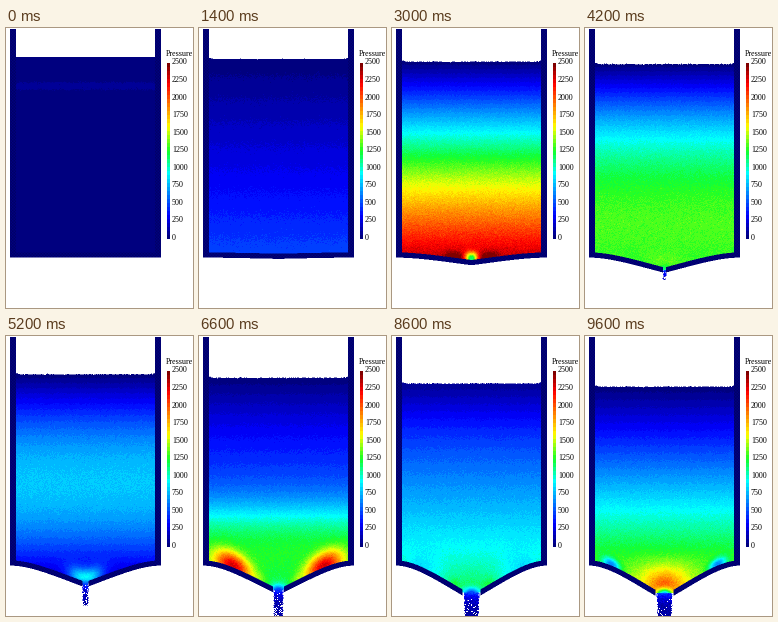
These frames come from a looping animation (187x280 px, 9.8 s). A matplotlib script:

```python
import numpy as np
import matplotlib.pyplot as plt
from matplotlib.animation import FuncAnimation
from matplotlib.colors import LinearSegmentedColormap

W, H, DPI = 187, 280, 100
FRAMES, STEP = 49, 200
SS = 2                                  # supersampling
CX, OUTER, INNER, HINGE_Y = 79.5, 75.5, 69.7, 227
OPENING = 3.3                           # seconds until the gates part
P_MAX = 2500

cmap = LinearSegmentedColormap.from_list("pressure", [
    (0, (0, 0, .5)), (.125, (0, 0, 1)), (.37, (0, 1, 1)), (.5, (.08, 1, .15)),
    (.64, (1, 1, 0)), (.89, (1, 0, 0)), (1, (.5, 0, 0))], N=44)

# Local pressure spots on the gates, mirrored about the axis:
# peak time, distance from the axis, x radius, y radius, pressure change
SPOTS = [
    (3.0, 0, 6, 6, -1250),
    (3.0, 17, 9, 5, 260),
    (5.2, 0, 16, 11, 850),
    (6.6, 45, 19, 14, 1150),
    (7.6, 41, 17, 19, -800),
    (7.6, 17, 7, 6, 850),
    (9.6, 0, 18, 21, 560),
    (9.6, 53, 9, 6, -700),
]

x = (np.arange(W * SS) + .5) / SS
y = (np.arange(H * SS) + .5) / SS
X, Y = np.meshgrid(x, y)
D = np.abs(X - CX)
rng = np.random.default_rng(4)
grain = rng.normal(0, 1, (H, W))
spray = rng.random((H, W))
ripple = rng.normal(0, .25, W).repeat(SS)


def enlarge(a):
    return a.repeat(SS, 0).repeat(SS, 1)


def pulse(t, peak, width):
    """Smooth rise and fall around a peak time."""
    return np.cos(np.pi / 2 * np.clip((t - peak) / width, -1, 1)) ** 2


def pressure(t, surface, gate_y):
    q = np.clip((Y - surface) / (229 - surface), 0, 1.1)
    load = 2280 * pulse(t, 3.0, 2.3) + 1330 * pulse(t, 9.6, 2.2)
    swell = 780 * pulse(t, 5.2, 2.9)
    surge = 1450 * pulse(t, 7.2, 1.9)
    front = .74 - .32 * (t - 6.6)
    p = 15 + load * q + swell * np.sin(.88 * np.pi * q)
    p += surge / (1 + np.exp((front - q) / .085))
    p += 60 * pulse(t, 0, 1.2) * np.exp(-((Y - 58) / 6) ** 2)
    for peak, dx, rx, ry, dp in SPOTS:
        offset = ((D - dx) / rx) ** 2 + ((gate_y - Y - 4) / ry) ** 2
        p += dp * pulse(t, peak, 1.3) * np.exp(-offset)
    return p


def picture(i):
    t = i * STEP / 1000
    surface = 29 + 1.25 * t + .105 * t ** 2
    drop = 30 * (1 - np.exp(-(t / 4.9) ** 2.5))
    gap = np.clip(1.7 * (t - OPENING), 0, 9)
    tip = HINGE_Y + drop

    # Gates bend like cantilevers under an even load
    s = np.clip((OUTER - D) / (OUTER - gap), 0, 1)
    gate_y = HINGE_Y + drop * s ** 2 * (6 - 4 * s + s ** 2) / 3
    slope = drop * (12 * s - 12 * s ** 2 + 4 * s ** 3) / 3 / (OUTER - gap)
    gate = np.abs(Y - gate_y) < 2.6 * np.hypot(1, slope)
    gate &= (D >= gap) & (D < OUTER)
    wall = (D > INNER) & (D < OUTER) & (Y > 1) & (Y < 229.5)

    level = surface + min(t / 3, 1) * ripple
    level = level - min(t, 1.5) * np.exp(-(INNER - D) / 2)
    water = (D < INNER + .1) & (Y > level) & (Y < gate_y)

    p = pressure(t, surface, gate_y)
    throat = np.exp(-(D / 8) ** 2 - ((Y - tip - 2) / 6) ** 2)
    p *= 1 - .7 * min(gap / 5, 1) * throat
    p += (.012 * p + 5) * enlarge(np.roll(grain, (i * 7, i * 13), (0, 1)))

    # Falling jet, loosening into drops toward its end
    if gap > 0:
        end = 238 + 17.5 * (t - 3.4)
        drops = enlarge(np.roll(spray, i * 5, 0))
        fall = np.clip((Y - tip) / 25, 0, 1)
        width = gap * (.85 - .12 * fall) + 1.4 * (drops - .5)
        holes = drops < fall * np.clip(.5 - gap * .04, .1, .5)
        jet = (Y > tip - 3) & (Y < end) & (D < width) & ~holes
        stream = 20 + 420 * np.exp(-np.clip(Y - tip, 0, None) / 6) + 150 * drops
        p = np.where(jet & (Y > tip), stream, p)
        water |= jet

    img = np.ones((H * SS, W * SS, 3))
    img[water] = cmap(np.clip(p[water] / P_MAX, 0, 1))[:, :3]
    solid = wall | gate
    beads = ((X % 3 < 1.5) ^ (Y % 3 < 1.5))[solid]
    img[solid] = np.where(beads[:, None], (0, 0, .4), (0, 0, .5))
    return img.reshape(H, SS, W, SS, 3).mean((1, 3))


fig = plt.figure(figsize=(W / DPI, H / DPI), dpi=DPI, facecolor="white")
ax = fig.add_axes([0, 0, 1, 1])
ax.axis("off")
stage = ax.imshow(picture(0), extent=(0, W, H, 0), interpolation="nearest",
                  aspect="auto")

ramp = np.linspace(1, 0, 176)[:, None]
ax.imshow(ramp, cmap=cmap, extent=(161, 164, 211, 35), aspect="auto",
          interpolation="nearest", zorder=2)
ax.set(xlim=(0, W), ylim=(H, 0))

font = dict(family="Liberation Serif", size=8 * 72 / DPI, color="black",
            va="baseline")
ax.text(159.5, 28.3, "Pressure", **font)
for value in range(0, P_MAX + 1, 250):
    ax.text(166, 212 - 175.5 * value / P_MAX, str(value), **font)


def update(i):
    stage.set_data(picture(i))
    return stage,


anim = FuncAnimation(fig, update, frames=FRAMES, interval=STEP, repeat=True,
                     repeat_delay=0, blit=False)
plt.show()
```
